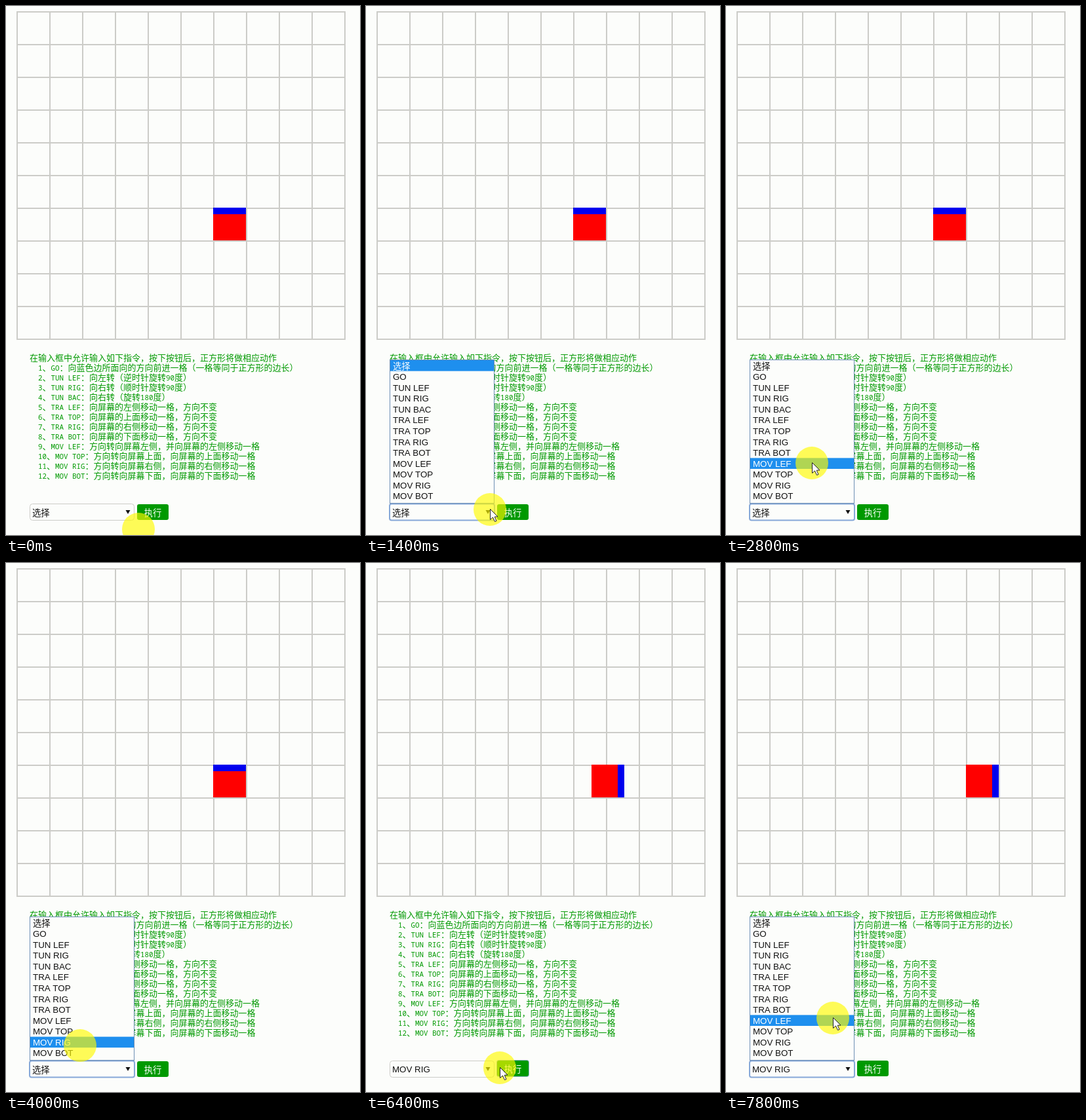
Recreate the animation shown at these times as an HTML page with a canvas. Size 540 by 808 pixels, loop 8 s.

```html
<!DOCTYPE html>
<html lang="zh-CN">
<head>
<meta charset="utf-8">
<style>
  html, body { margin: 0; width: 100%; height: 100%; overflow: hidden; background: #fcfdfb; }
  canvas { display: block; }
</style>
</head>
<body>
<canvas id="stage" width="540" height="808"></canvas>
<script>
const ctx = document.getElementById('stage').getContext('2d');
const LOOP = 8000, STEP = 200;
const PAGE = '#fcfdfb', LINE = '#ccccc8';
const CJK = '"Noto Sans CJK SC", "Noto Sans CJK JP", sans-serif';
const NOTE_LATIN = '10.83px "Noto Sans Mono", monospace';
const NOTE_CJK = '13px ' + CJK;
const UI_FONT = '13.33px "Liberation Sans", ' + CJK;

const NOTES = [
  '在输入框中允许输入如下指令，按下按钮后，正方形将做相应动作',
  '  1、GO：向蓝色边所面向的方向前进一格（一格等同于正方形的边长）',
  '  2、TUN LEF：向左转（逆时针旋转90度）',
  '  3、TUN RIG：向右转（顺时针旋转90度）',
  '  4、TUN BAC：向右转（旋转180度）',
  '  5、TRA LEF：向屏幕的左侧移动一格，方向不变',
  '  6、TRA TOP：向屏幕的上面移动一格，方向不变',
  '  7、TRA RIG：向屏幕的右侧移动一格，方向不变',
  '  8、TRA BOT：向屏幕的下面移动一格，方向不变',
  '  9、MOV LEF：方向转向屏幕左侧，并向屏幕的左侧移动一格',
  '  10、MOV TOP：方向转向屏幕上面，向屏幕的上面移动一格',
  '  11、MOV RIG：方向转向屏幕右侧，向屏幕的右侧移动一格',
  '  12、MOV BOT：方向转向屏幕下面，向屏幕的下面移动一格'
];
const OPTIONS = ['选择', 'GO', 'TUN LEF', 'TUN RIG', 'TUN BAC', 'TRA LEF', 'TRA TOP',
  'TRA RIG', 'TRA BOT', 'MOV LEF', 'MOV TOP', 'MOV RIG', 'MOV BOT'];
const MENU_TOP = 541, ROW = 16.6;

// Pointer path: time, x, y
const PATH = [
  [0, 202, 798], [400, 200, 790], [1000, 189, 768], [1600, 189, 768],
  [2400, 137, 703], [2800, 131, 697], [3200, 124, 714], [3800, 113, 736],
  [4200, 113, 736], [4800, 227, 774], [5600, 227, 774], [6400, 204, 770],
  [6800, 187, 769], [7200, 186, 768], [7800, 163, 694], [8000, 163, 694]
];

function pointerAt(t) {
  const i = Math.max(1, PATH.findIndex(p => p[0] >= t));
  const [t0, x0, y0] = PATH[i - 1], [t1, x1, y1] = PATH[i];
  const k = (t - t0) / (t1 - t0);
  return [x0 + (x1 - x0) * k, y0 + (y1 - y0) * k];
}

function rect(x, y, w, h, color) {
  ctx.fillStyle = color;
  ctx.fillRect(x, y, w, h);
}

function roundBox(x, y, w, h, r, fill, stroke, lineWidth = 1) {
  ctx.beginPath();
  ctx.roundRect(x, y, w, h, r);
  ctx.fillStyle = fill;
  ctx.fill();
  if (!stroke) return;
  ctx.strokeStyle = stroke;
  ctx.lineWidth = lineWidth;
  ctx.stroke();
}

function polygon(points, fill, stroke) {
  ctx.beginPath();
  points.forEach(([x, y]) => ctx.lineTo(x, y));
  ctx.closePath();
  ctx.fillStyle = fill;
  ctx.fill();
  if (!stroke) return;
  ctx.strokeStyle = stroke;
  ctx.lineWidth = 1;
  ctx.stroke();
}

function label(text, x, y, color) {
  ctx.font = UI_FONT;
  ctx.fillStyle = color;
  ctx.fillText(text, x, y);
}

function drawGrid() {
  for (let i = 0; i <= 10; i++) {
    rect(16 + 50 * i, 8, 2, 502, LINE);
    rect(16, 8 + 50 * i, 502, 2, LINE);
  }
}

// Turns one degree per tick for 90 ticks, then slides one pixel per tick.
function drawSquare(t) {
  const ticks = Math.max(0, 30 + (t - 5200) * 88 / 1200);
  const angle = Math.min(90, ticks);
  const shift = Math.min(50, Math.max(0, ticks - 90));
  ctx.save();
  ctx.translate(341 + shift, 333);
  ctx.rotate(angle * Math.PI / 180);
  rect(-25, -25, 50, 50, '#f00');
  rect(-25, -25, 50, 10, '#00e');
  ctx.restore();
}

function drawNotes() {
  ctx.fillStyle = '#090';
  NOTES.forEach((line, i) => {
    let x = 36;
    for (const run of line.match(/[\x00-\x7f]+|[^\x00-\x7f]+/g)) {
      ctx.font = run.charCodeAt(0) < 128 ? NOTE_LATIN : NOTE_CJK;
      ctx.fillText(run, x, 542 + 15 * i);
      x += ctx.measureText(run).width;
    }
  });
}

function drawControls(selected, selectFocus, buttonFocus) {
  // Chinese text sits one pixel lower than Latin and pulls the button along.
  const drop = selected === 0 ? 1 : 0;
  if (selectFocus) roundBox(36, 760.5, 160, 25, 3, PAGE, '#86a8d8', 2);
  else roundBox(36.5, 760.5, 159, 25, 4, PAGE, LINE);
  label(OPTIONS[selected], 40, 778 + drop, '#111');
  polygon([[182.5, 770], [189.5, 770], [186, 776]], '#111');
  if (buttonFocus) roundBox(199, 759, 50, 26, 4, '#8cb4c8');
  roundBox(200, 760 + drop, 48, 24, 3, '#090');
  label('执行', 210.7, 778 + drop, '#fff');
}

function drawMenu(active) {
  rect(36, 540, 160, 220, '#6d8fb5');
  rect(37, 541, 158, 218, PAGE);
  rect(37, MENU_TOP + ROW * active, 158, ROW, '#1e8fee');
  OPTIONS.forEach((text, i) =>
    label(text, 41, 554.5 + 16.58 * i, i === active ? '#fff' : '#111'));
}

function drawPointer(x, y, arrow) {
  ctx.beginPath();
  ctx.arc(x, y + 1, 25, 0, 2 * Math.PI);
  ctx.fillStyle = 'rgba(255, 250, 0, .65)';
  ctx.fill();
  if (!arrow) return;
  const shape = [[0, 0], [0, 16], [4, 12.5], [7, 19], [9.5, 18], [6.7, 11.7], [11.5, 11.5]];
  polygon(shape.map(([px, py]) => [x + px + .5, y + py + .5]), '#fff', '#222');
}

function draw(t) {
  const [x, y] = pointerAt(t);
  const within = (from, to) => t >= from && t < to;
  const selected = t < 4200 ? 0 : 11;
  const open = within(1200, 4200) || t >= 7000;
  const row = Math.floor((y - MENU_TOP) / ROW);

  rect(0, 0, 540, 808, PAGE);
  drawGrid();
  drawSquare(t);
  drawNotes();
  drawControls(selected, within(1200, 5000) || t >= 7000, within(5000, 7000));
  if (open) drawMenu(row < OPTIONS.length ? row : selected);
  drawPointer(x, y, t >= 200 && !within(4000, 4200));
}

function frame() {
  const t = performance.now() % LOOP;
  draw(Math.floor(t / STEP) * STEP);
  requestAnimationFrame(frame);
}
frame();
</script>
</body>
</html>
```
